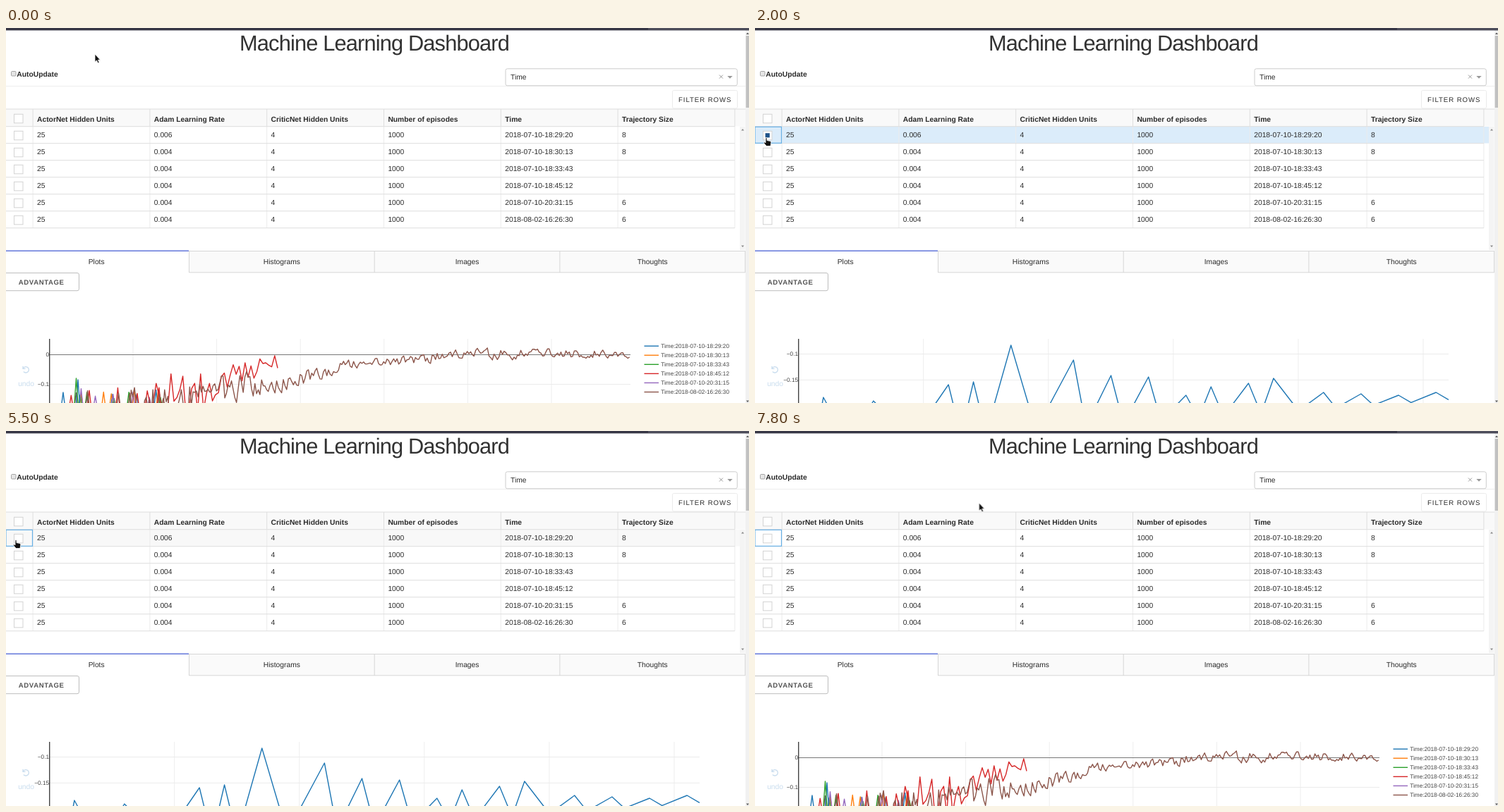
Animation, 1053 px wide and 532 px high, one loop 8000 ms. Source, as an HTML page:

```html
<!DOCTYPE html>
<html lang="en">
<head>
<meta charset="utf-8">
<title>Machine Learning Dashboard</title>
<style>
html, body { margin: 0; width: 100%; height: 100%; overflow: hidden; background: #fff; }
svg { display: block; width: 1053px; height: 532px; }
text { font: 10.3px "Liberation Sans", Arial, sans-serif; fill: #2b2b2b; text-rendering: geometricPrecision; white-space: pre; }
text.bold { font-weight: 700; }
text.title { font-size: 30.8px; letter-spacing: -.85px; fill: #323232; }
text.button { font-size: 9.6px; letter-spacing: .95px; }
text.strong { font-weight: 700; letter-spacing: .6px; fill: #555; }
text.small { font-size: 8.2px; fill: #444; }
text.undo { fill: #c9ddee; }
.series { fill: none; stroke-width: 1.4; stroke-linejoin: round; }
</style>
</head>
<body>
<svg id="stage" viewBox="0 0 1053 532" xmlns="http://www.w3.org/2000/svg"></svg>
<script>
const LOOP = 8000;
const stage = document.getElementById('stage');

function add(parent, tag, attrs = {}, text) {
  const el = document.createElementNS('http://www.w3.org/2000/svg', tag);
  for (const k in attrs) el.setAttribute(k, attrs[k]);
  if (text !== undefined) el.textContent = text;
  parent.append(el);
  return el;
}
const group = (parent, attrs) => add(parent, 'g', attrs);
const rect = (p, x, y, width, height, fill, more) => add(p, 'rect', { x, y, width, height, fill, ...more });
const path = (p, d, fill, more) => add(p, 'path', { d, fill, ...more });
const label = (p, x, y, text, cls = '', anchor = 'start') =>
  add(p, 'text', { x, y, class: cls, 'text-anchor': anchor }, text);
const hline = (p, x1, x2, y, color, h = 1) => rect(p, x1, y, x2 - x1, h, color);
const vline = (p, x, y1, y2, color, w = 1) => rect(p, x, y1, w, y2 - y1, color);
const curve = (p, pts, stroke) =>
  add(p, 'polyline', { class: 'series', stroke, points: pts.map(q => q.join()).join(' ') });
const range = (n, f) => Array.from({ length: n }, (_, i) => f(i));

// Hold each value until the next step.
function animate(el, steps) {
  const frames = steps.map(([t, props]) => ({ ...props, offset: t / LOOP, easing: 'steps(1, end)' }));
  frames.push({ ...steps[steps.length - 1][1], offset: 1 });
  el.animate(frames, { duration: LOOP, iterations: Infinity });
}
function show(el, ...spans) {
  const steps = [[0, { opacity: 0 }]];
  for (const [from, to] of spans) {
    if (from === 0) steps[0][1] = { opacity: 1 };
    else steps.push([from, { opacity: 1 }]);
    if (to < LOOP) steps.push([to, { opacity: 0 }]);
  }
  animate(el, steps);
}
// Each key is reached in n eased steps of 100 ms; one step is a jump.
function move(el, keys) {
  const steps = [];
  let px = 0, py = 0;
  for (const [t, x, y, n = 1] of keys) {
    for (let i = 1; i <= n; i++) {
      const k = (1 - Math.cos(Math.PI * i / n)) / 2;
      const transform = `translate(${px + (x - px) * k}px, ${py + (y - py) * k}px)`;
      steps.push([t - (n - i) * 100, { transform }]);
    }
    [px, py] = [x, y];
  }
  animate(el, steps);
}

function random(seed) {
  return () => (seed = (seed * 16807) % 2147483647) / 2147483647;
}
function lerp(pts, x) {
  let i = 1;
  while (i < pts.length - 1 && pts[i][0] < x) i++;
  const [x0, y0] = pts[i - 1], [x1, y1] = pts[i];
  return y0 + (y1 - y0) * (x - x0) / (x1 - x0);
}

rect(stage, 0, 0, 1053, 532, '#fff');
const page = group(stage);

// Heading and filters
label(page, 522, 32.3, 'Machine Learning Dashboard', 'title', 'middle');
rect(page, 7.5, 61.5, 6.5, 6.5, '#e6e6e6', { stroke: '#a5a5a5', rx: 1 });
label(page, 15.3, 69, 'AutoUpdate', 'bold');
hline(page, 0, 1048, 82, '#eee');
rect(page, 708, 57.8, 328.3, 24, '#fff', { stroke: '#ccc', rx: 2.5 });
label(page, 715, 73, 'Time');
path(page, 'M1011 66.6l5 5m0 -5l-5 5', 'none', { stroke: '#999' });
path(page, 'M1022.3 68h7.4l-3.7 3.7z', '#999');
rect(page, 944.5, 88.5, 92, 25.5, '#fff', { stroke: '#ebebeb', rx: 2 });
label(page, 953, 104.6, 'FILTER ROWS', 'button');

// Table
const colX = i => 44 + 165.8 * i;
const heads = ['ActorNet Hidden Units', 'Adam Learning Rate', 'CriticNet Hidden Units',
  'Number of episodes', 'Time', 'Trajectory Size'];
const runs = [
  ['2018-07-10-18:29:20', '8'], ['2018-07-10-18:30:13', '8'], ['2018-07-10-18:33:43', ''],
  ['2018-07-10-18:45:12', ''], ['2018-07-10-20:31:15', '6'], ['2018-08-02-16:26:30', '6']];

rect(page, 0, 115, 1048, 24.5, '#f9f9f9');
hline(page, 0, 1048, 114.5, '#dedede');
rect(page, 1040, 140, 7.5, 175, '#f4f4f4');
path(page, 'M1042 145.5h4l-2 -2.5z M1042 308.5h4l-2 2.5z', '#888');

const rowFill = (row, color) => rect(page, 0, 140 + 24 * row, 1040, 23.5, color);
show(rowFill(0, '#f8f8f8'), [1100, 1500], [5500, 6900]);
show(rowFill(3, '#f8f8f8'), [3800, 4500]);
show(rowFill(0, '#dbecfa'), [1500, 5500]);

for (let i = 0; i < 7; i++) {
  vline(page, colX(i) - 6.4, 115, 139.5, '#dedede');
  vline(page, colX(i) - 6.4, 139.5, 283.5, '#ebebeb');
}
hline(page, 0, 1033, 139.2, '#dcdcdc');
const box = y => rect(page, 11.5, y, 12.5, 12.5, '#fff', { stroke: '#d3d3d3' });
box(122.3);
heads.forEach((h, i) => label(page, colX(i), 132.5, h, 'bold'));
runs.forEach(([time, size], r) => {
  const y = 24 * r;
  hline(page, 0, 1033, 163.2 + y, '#dedede');
  box(146.3 + y);
  [25, r ? '0.004' : '0.006', 4, 1000, time, size].forEach((v, i) => label(page, colX(i), 155 + y, v));
});
show(rect(page, 14.6, 149.2, 6.2, 6.2, '#1d5288'), [1500, 5500]);
show(rect(page, 0, 140.3, 37.5, 23, 'none', { stroke: '#68b1e6', 'stroke-width': 1.2 }), [1500, LOOP]);

// Tabs
rect(page, 259.5, 316.5, 788, 30, '#fafafa');
hline(page, 259.5, 1047.5, 316, '#d6d6d6');
hline(page, 259.5, 1047.5, 346.3, '#d6d6d6');
hline(page, 0, 259, 315.4, '#6d7fdc', 1.6);
['Plots', 'Histograms', 'Images', 'Thoughts'].forEach((t, i) => {
  vline(page, 259 + 262.7 * i, 316, 347, '#d6d6d6');
  label(page, 128.2 + 262.7 * i, 334.8, t, '', 'middle');
});
rect(page, -4, 347.5, 107.5, 25.2, '#fff', { stroke: '#bdbdbd', rx: 2.5 });
label(page, 17.8, 363.8, 'ADVANTAGE', 'button strong');

// Plots
const clip = add(add(stage, 'defs'), 'clipPath', { id: 'plot' });
rect(clip, 62, 441, 940, 300, '#000');

function plot(right, top, gap, ticks, gridGap, offset) {
  const g = group(page);
  for (let x = 61 + offset; x < right; x += gridGap) vline(g, x, 441, 700, '#eee');
  ticks.forEach((t, i) => {
    const y = top + gap * i;
    hline(g, 62, right, y, t === '0' ? '#777' : '#ebebeb');
    label(g, 61, y + 3.4, t, 'small', 'end');
  });
  vline(g, 61, 441, 700, '#444', 1.4);
  return [g, group(g, { 'clip-path': 'url(#plot)' })];
}

const [single, singleLines] = plot(983, 462, 36.8, ['−0.1', '−0.15', '−0.2', '−0.25'], 177.1, 177.1);
// Peaks by episode, with a valley midway that gets shallower over time.
const peaks = [[2, 524], [6, 529], [12, 506], [14, 502], [17, 450], [22, 471], [25, 493], [28, 495],
  [31, 521], [33, 509], [36, 504], [38, 497], [42, 517], [45, 519], [48, 521], [51, 517]];
const wave = [[1, 616]];
peaks.forEach(([i, y], k) => {
  wave.push([i, y]);
  const next = k + 1 < peaks.length ? peaks[k + 1][0] : 53;
  const mid = Math.floor((i + next) / 2);
  wave.push([mid, 595 - 1.3 * mid]);
});
curve(singleLines, wave.map(([i, y]) => [61.5 + 17.72 * i, y]), '#1f77b4');

const [all, allLines] = plot(885, 463, 42, ['0', '−0.1'], 118.6, 118.5);
const colors = ['#1f77b4', '#ff7f0e', '#2ca02c', '#d62728', '#9467bd', '#8c564b'];
const rnd = random(4177);
const spike = (x, y, color) => curve(allLines, [[x - 3, 540], [x, y], [x + 3, 540]], color);
colors.forEach(color => range(5, i => spike(80 + 30 * (i + rnd()), 510 + 16 * rnd(), color)));
spike(102, 499, colors[0]);
spike(99.5, 497, colors[2]);

function noisy(trend, spread, step, keep, color) {
  const pts = [], end = trend[trend.length - 1][0];
  let n = 0;
  for (let x = trend[0][0]; x <= end; x += step) {
    n = keep * n + 2 * rnd() - 1;
    pts.push([x, lerp(trend, x) + n * lerp(spread, x)]);
  }
  curve(allLines, pts, color);
}
noisy([[196, 528], [300, 515], [322, 488], [345, 488], [367, 475], [389, 474]],
  [[196, 36], [300, 26], [320, 12], [389, 9]], 4.2, -.3, colors[3]);
noisy([[175, 540], [260, 525], [340, 507], [400, 503], [480, 479], [540, 473], [650, 463], [885, 462]],
  [[175, 34], [300, 20], [380, 12], [500, 6], [700, 7], [885, 5]], 2.37, .35, colors[5]);

runs.forEach(([time], i) => {
  const y = 451.2 + 13.05 * i;
  hline(all, 904.5, 925, y - .7, colors[i], 1.4);
  label(all, 928.3, y + 3, 'Time:' + time, 'small');
});
show(all, [0, 2000], [6100, LOOP]);
show(single, [2000, 6100]);

// Fixed parts
rect(stage, 1048, 3, 5, 529, '#f1f1f1');
path(stage, 'M1049 9h4l-2 -2.5z M1049 528.5h4l-2 2.5z', '#555');
const thumb = rect(stage, 1048.7, 11, 4.3, 102, '#c1c1c1');
path(stage, 'M24.6 482.5a4.2 4.2 0 1 1 .3 5 M24 479.8v3.6h3.6', 'none', { stroke: '#c9ddee', 'stroke-width': 1.3 });
label(stage, 28.6, 508, 'undo', 'undo', 'middle');
rect(stage, 0, 0, 1053, 3.4, '#363645');
rect(stage, 910, 0, 143, 2.6, '#50505d');

const scroll = [[0, 0], [3800, 60.5], [4500, 30], [4700, 0]];
move(page, scroll.map(([t, y]) => [t, 0, -y]));
move(thumb, scroll.map(([t, y]) => [t, 0, y / 5]));

// Brief flash of the desktop
const desk = group(stage);
path(desk, 'M0 0H1053V314H970.5V37.4H82.4V210H0z', '#383838');
path(desk, 'M0 0H1053V10L690 11L302 13L460 3L0 1z', '#000');
path(desk, 'M530 37.4C534 22 546 14 560 12H599L576 20L567 37.4z', '#fdb35c');
path(desk, 'M565 37.4L572 14L577 12L582 37.4z M646 37.4C655 27 673 17 692 11L683 37.4z', '#fcebd7');
const bit = random(91);
function specks(n, x, y, w, h, color) {
  range(n, () => rect(desk, x + bit() * w, y + bit() * h, 1 + bit() * 4, 1.2, color));
}
specks(24, 142, 20, 900, 6, '#fff');
specks(10, 0, 211, 76, 6, '#222');
specks(10, 971, 314, 76, 4, '#222');
specks(16, 700, 9, 340, 4, '#000');
show(desk, [6900, 7100]);

// Pointer
const pointer = group(stage);
const outline = { stroke: '#fff', 'stroke-width': .8, 'stroke-linejoin': 'round' };
const arrow = path(pointer, 'M0 0V11.2L2.5 9L4.3 12.8L6.2 12L4.5 8.3H7.6z', '#111', outline);
const hand = path(pointer,
  'M3 1Q4 -.2 5 1V4.5L9.5 5.4Q11 5.8 10.8 7.5L10 12.5H4.2L.4 8Q.2 6.4 2 7L3 7.8z', '#111', outline);
show(arrow, [0, 1100], [3800, 4700], [6600, LOOP]);
show(hand, [1100, 3800], [4700, 6600]);
move(pointer, [
  [0, 126, 37], [900, 13, 107, 9], [1300, 10.5, 154.5, 4], [1700, 12, 155],
  [3800, 32, 173.5], [4100, 49.5, 220], [4700, 13, 169], [5000, 11, 156, 2], [5200, 10, 154],
  [6600, 15, 140], [6900, 91.5, 119], [7100, 88.5, 111.5], [7400, 172, 110.5],
  [7600, 311, 109.5], [7800, 317.5, 102]]);
</script>
</body>
</html>
```
